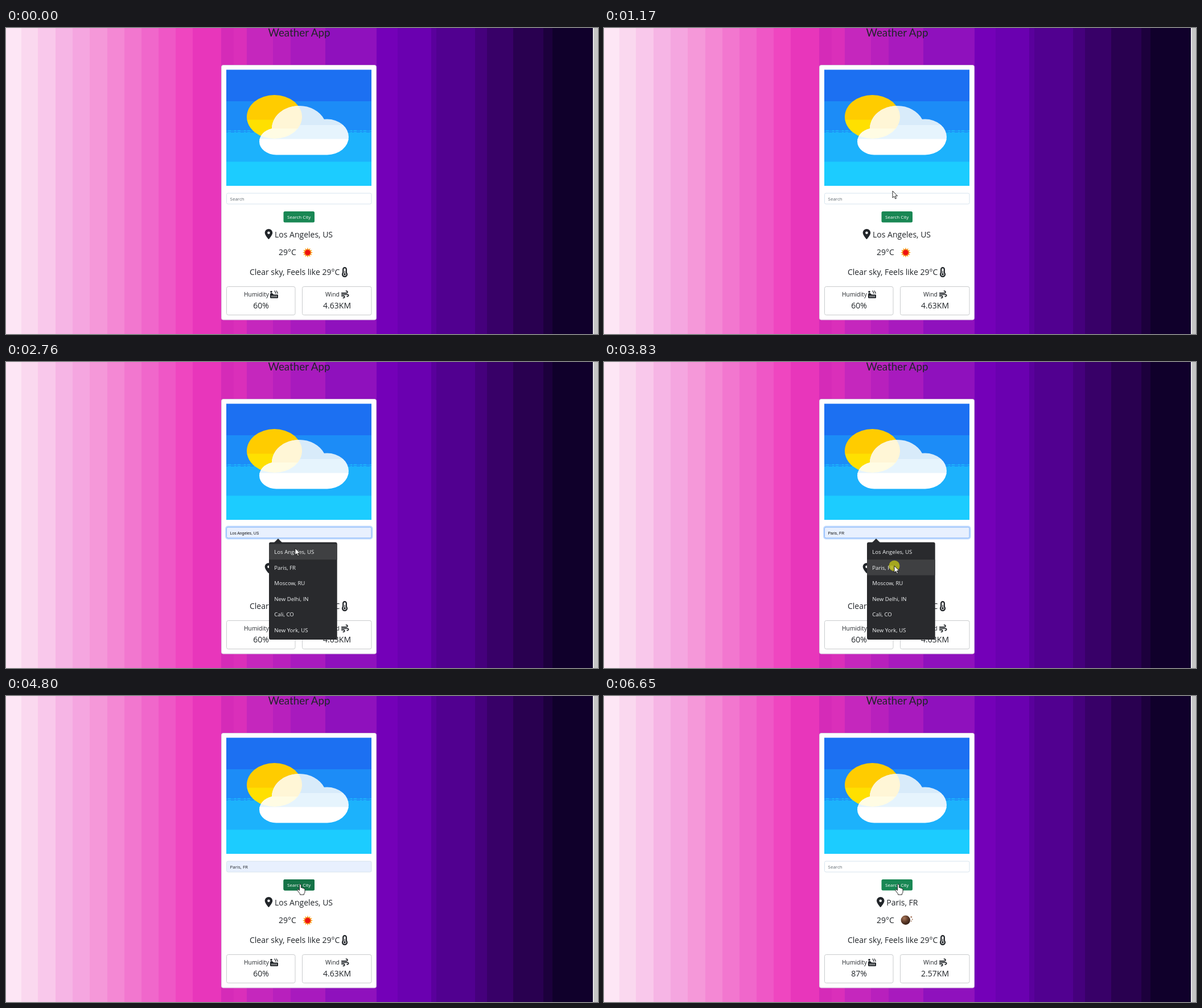
Animation of 1040x539 px, one loop 8000 ms. Source, as an HTML page:

```html
<!DOCTYPE html>
<html lang="en">
<head>
<meta charset="utf-8">
<title>Weather App</title>
<style>
  html, body { margin: 0; width: 100%; height: 100%; overflow: hidden; background: #10002b; }
  svg { display: block; }
  text { font: 500 14px "Open Sans", "Noto Sans", sans-serif; fill: #212529; }
  .mid { text-anchor: middle; }
  .title { font: 400 18.8px Lato, sans-serif; }
  .label { font-size: 10.3px; }
  .small { font-size: 8px; font-weight: 400; }
  .hint { fill: #5f686f; }
  .preview { font: 6.9px "Liberation Sans", Arial, sans-serif; fill: #111; }
  .menu text { font-size: 9.6px; font-weight: 400; fill: #f1f3f4; }
  .icon { fill: #212529; }
  .box { fill: #fff; stroke: #c9cbcd; }
</style>
</head>
<body>
<svg width="1040" height="539" viewBox="0 0 1040 539">
  <defs>
    <clipPath id="cloud">
      <ellipse cx="515" cy="177" rx="48" ry="40"/>
      <ellipse cx="564" cy="192" rx="38" ry="31.5"/>
      <ellipse cx="475" cy="200" rx="30" ry="23.5"/>
      <rect x="475" y="180" width="89" height="43.5"/>
    </clipPath>
    <clipPath id="sun"><ellipse cx="471.5" cy="156.5" rx="48.5" ry="38.5"/></clipPath>
    <radialGradient id="moon" cx=".35" cy=".3" r=".75">
      <stop offset="0" stop-color="#a9785a"/><stop offset=".5" stop-color="#65402d"/><stop offset="1" stop-color="#2d1a12"/>
    </radialGradient>
    <path id="pin" d="M215.7 499.2C267 435 384 279.4 384 192C384 86 298 0 192 0S0 86 0 192c0 87.4 117 243 168.3 307.2c12.3 15.3 35.1 15.3 47.4 0zM192 128a64 64 0 1 1 0 128 64 64 0 1 1 0-128z"/>
  </defs>

  <g id="stripes"></g>
  <path fill="#c5c5c5" d="M1031 0h9v539h-9z"/>
  <path fill="#f4f4f4" d="M1031 0h1.5v539h-1.5z"/>
  <text class="title mid" x="515" y="15">Weather App</text>

  <rect x="378.5" y="65.5" width="272" height="448.5" rx="3" fill="#fff" stroke="#d9cfe0"/>

  <!-- Sky, sun and cloud -->
  <path fill="#1c70f2" d="M387 73.5h255V130H387z"/>
  <path fill="#1c8cf7" d="M387 129h255v52H387z"/>
  <path fill="#1cb2fc" d="M387 180h255v56H387z"/>
  <path fill="#1cccff" d="M387 235.5h255V278H387z"/>
  <path stroke="#1c8cf7" d="M387 182.5h255"/>
  <path stroke="#1c8cf7" stroke-dasharray="3 5 6 3" d="M387 180.5h255M387 183.5h255"/>
  <g clip-path="url(#sun)">
    <path fill="#fc0" d="M420 115h105v47H420z"/>
    <path fill="#ffe000" d="M420 161.5h105v40H420z"/>
  </g>
  <g clip-path="url(#cloud)">
    <path fill="#d8ebfa" d="M440 130h170v42H440z"/>
    <path fill="#e6f4fd" d="M440 171h170v26H440z"/>
    <g clip-path="url(#sun)">
      <path fill="#fff6d6" d="M440 130h90v48h-90z"/>
      <path fill="#fffce4" d="M440 177h90v20h-90z"/>
    </g>
    <path fill="#fff" d="M440 195.5h170v30H440z"/>
  </g>

  <!-- Search form -->
  <rect id="field" x="387.5" y="291" width="254.5" height="19" rx="2.5" stroke="#d6e4ee"/>
  <g id="focus" fill="none">
    <rect x="386.3" y="289.8" width="257" height="21.4" rx="3.5" stroke="#c2dbfe" stroke-width="2.4"/>
    <rect x="387.5" y="291" width="254.5" height="19" rx="2.5" stroke="#86b7fe"/>
  </g>
  <text id="query" x="393.5" y="303.6"></text>
  <path id="caret" stroke="#222" d="M394.5 294v12"/>
  <rect x="487.5" y="323" width="54.5" height="19.5" rx="2.5" fill="#198754"/>
  <rect id="hover" x="487.5" y="323" width="54.5" height="19.5" rx="2.5" fill="#157347"/>
  <text class="small mid" x="514.7" y="335.8" style="fill:#fff">Search City</text>

  <!-- Weather report -->
  <g id="place">
    <use href="#pin" class="icon" transform="translate(454.7 354) scale(.0352)"/>
    <text id="city" x="472" y="369"></text>
  </g>
  <text x="479" y="399.5">29°C</text>
  <g id="day" transform="translate(530 395.5)">
    <path id="rays" fill="#f7a21b"/>
    <circle r="5.4" fill="#f5501c"/><circle r="4.3" fill="#ee1010"/>
  </g>
  <g id="night">
    <circle cx="529.8" cy="394.8" r="8.2" fill="url(#moon)"/>
    <g fill="#a5785e"><circle cx="539.8" cy="389.3" r="1.4"/><circle cx="541.7" cy="393.5" r="1"/><circle cx="539.7" cy="396.5" r="1"/></g>
  </g>
  <text x="428" y="434.8">Clear sky, Feels like 29°C</text>
  <path class="icon" transform="translate(589.4 421) scale(.0352)" d="M160 64c-26.5 0-48 21.5-48 48V276.5c0 17.3-7.1 31.9-15.3 42.5C86.2 332.6 80 349.5 80 368c0 44.2 35.8 80 80 80s80-35.8 80-80c0-18.5-6.2-35.4-16.7-48.9c-8.2-10.6-15.3-25.2-15.3-42.5V112c0-26.5-21.5-48-48-48zM48 112C48 50.2 98.1 0 160 0s112 50.1 112 112V276.5c0 .1 .1 .3 .2 .6c.2 .6 .8 1.6 1.7 2.8c18.9 24.4 30.1 55 30.1 88.1c0 79.5-64.5 144-144 144S16 447.5 16 368c0-33.2 11.2-63.8 30.1-88.1c.9-1.2 1.5-2.2 1.7-2.8c.1-.3 .2-.5 .2-.6V112zM208 368c0 26.5-21.5 48-48 48s-48-21.5-48-48c0-20.9 13.4-38.7 32-45.3V208c0-8.8 7.2-16 16-16s16 7.2 16 16V322.7c18.6 6.6 32 24.4 32 45.3z"/>

  <rect class="box" x="387.5" y="455.5" width="120.5" height="50" rx="3"/>
  <text class="label" x="418" y="473">Humidity</text>
  <circle class="icon" cx="466" cy="464.7" r="1.8"/>
  <path class="icon" d="M464 469q0-2 2-2h1.5l3 2.5H477q1 0 1 1v4q0 1.5-1.5 1.5h-11q-1.5 0-1.5-1.5z"/>
  <path stroke="#fff" d="M467.2 471.3v3.2M469.8 471.3v3.2M472.4 471.3v3.2M475 471.3v3.2"/>
  <path fill="none" stroke="#212529" stroke-width="1.2" d="M472 462.5q0 1.5 1 2.5t1 3M475.2 462.5q0 1.5 1 2.5t1 3"/>
  <text id="humidity" class="mid" x="448" y="494"></text>

  <rect class="box" x="520.5" y="455.5" width="121.5" height="50" rx="3"/>
  <text class="label" x="561" y="473">Wind</text>
  <path class="icon" transform="translate(588.8 462.5) scale(.0268)" d="M288 32c0 17.7 14.3 32 32 32h32c17.7 0 32 14.3 32 32s-14.3 32-32 32H32c-17.7 0-32 14.3-32 32s14.3 32 32 32H352c53 0 96-43 96-96s-43-96-96-96H320c-17.7 0-32 14.3-32 32zm64 352c0 17.7 14.3 32 32 32h32c53 0 96-43 96-96s-43-96-96-96H32c-17.7 0-32 14.3-32 32s14.3 32 32 32H416c17.7 0 32 14.3 32 32s-14.3 32-32 32H384c-17.7 0-32 14.3-32 32zM128 512h32c53 0 96-43 96-96s-43-96-96-96H32c-17.7 0-32 14.3-32 32s14.3 32 32 32H160c17.7 0 32 14.3 32 32s-14.3 32-32 32H128c-17.7 0-32 14.3-32 32s14.3 32 32 32z"/>
  <text id="wind" class="mid" x="581.6" y="494"></text>

  <!-- Suggestions -->
  <g id="menu" class="menu">
    <path fill="#292a2d" d="M470 319l8-8 8 8z"/>
    <rect x="462" y="317.5" width="119.7" height="171.5" rx="3" fill="#292a2d"/>
    <rect id="row" x="462" width="119.7" height="27.6" fill="#3f4042"/>
    <g id="items"></g>
  </g>

  <!-- Pointer -->
  <circle id="click" r="9.5" fill="#c8c814" opacity=".75"/>
  <g id="pointer">
    <path id="arrow" fill="#fff" stroke="#111" stroke-width=".9" d="M0 0v12l2.8-2.5 1.9 4.3 1.9-.8-1.9-4.2h3.8z"/>
    <path id="beam" fill="none" stroke="#111" d="M-3-6.5h2q1 0 1 1 0-1 1-1h2M0-6V6M-3 6.5h2q1 0 1-1 0 1 1 1h2"/>
    <path id="hand" fill="#fff" stroke="#111" stroke-width=".9" d="M-1.5 9.5V1q0-1.5 1.4-1.5T1.3 1v4.5q2.4-.8 2.6 1 2-.8 2.4.8 1.8-.3 1.8 1.5v4q0 2-1.6 3.5v1.7H-.5V16.5L-4.7 11q-1.2-1.7.2-2.3 1.1-.4 3 1.8z"/>
  </g>
</svg>

<script>
const LOOP = 8000;
const $ = id => document.getElementById(id);
const show = (id, on) => $(id).style.display = on ? '' : 'none';
const ramp = (t, start, end) => Math.min(1, Math.max(0, (t - start) / (end - start)));

const stripes = '0 fde6f5,27 fad8ef,56 f9c8eb,87 f6b5e5,117 f5a6e0,147 f598d9,178 f488d4,208 f277cf,238 f067cb,268 ef57c6,298 ef46c0,328 e836bb,378 d52bb8,400 da2fba,423 c527bd,469 b820bd,500 a81abe,561 8f11bd,651 7400b8,688 6a00b0,747 5a009c,756 510090,824 45007c,845 380068,891 290050,944 1c003c,960 10002b';
$('stripes').innerHTML = stripes.split(',').map(s => {
  const [x, color] = s.split(' ');
  return `<path fill="#${color}" d="M${x} 0H1031V539H${x}z"/>`;
}).join('');

const cities = ['Los Angeles, US', 'Paris, FR', 'Moscow, RU', 'New Delhi, IN', 'Cali, CO', 'New York, US'];
$('items').innerHTML = cities.map((c, i) => `<text x="471.3" y="${338.2 + 27.55 * i}">${c}</text>`).join('');

const star = Array.from({ length: 24 }, (_, i) => {
  const a = i * Math.PI / 12, r = i % 2 ? 5.5 : 9;
  return `${r * Math.cos(a)} ${r * Math.sin(a)}`;
});
$('rays').setAttribute('d', `M${star.join('L')}z`);

// Pointer stops: time, x, y
const stops = [
  [70, 910, 395], [260, 882, 368], [330, 855, 343],
  [590, 811, 337], [660, 745, 326], [730, 668, 311], [800, 595, 297], [860, 535, 286],
  [930, 496, 282], [1000, 488, 282], [1070, 498, 285], [1170, 507, 287],
  [1370, 508, 294], [1430, 508, 297], [1500, 508, 300], [1570, 508, 303], [1690, 508, 305.5],
  [2620, 508, 320], [2690, 508, 325], [2760, 508, 328], [2830, 508, 330],
  [3360, 508, 336], [3430, 509, 344], [3500, 509, 351], [3570, 510, 356], [3640, 510, 359],
  [4170, 510, 357], [4240, 511, 351], [4310, 513, 342], [4380, 515, 337], [4450, 516, 334], [4520, 517, 332]
];
// Pointer shapes by start time
const shapes = [[70, 'arrow'], [1370, 'beam'], [2620, 'arrow'], [3980, 'beam'], [4310, 'hand']];
const last = (list, t) => list.filter(k => k[0] <= t).pop();

function setQuery(text, style) {
  $('query').textContent = text;
  $('query').setAttribute('class', style);
}

function draw(t) {
  const done = t >= 6520;
  const open = t >= 2140 && t < 3900;
  const pick = t < 2620 ? -1 : t < 3500 ? 0 : 1;

  if (done || pick < 0) setQuery('Search', 'small hint');
  else setQuery(cities[pick], open ? 'preview' : 'small');
  $('field').setAttribute('fill', pick >= 0 && !done ? '#e8f0fe' : '#fff');
  $('focus').style.opacity = t < 2140 ? 0 : 1 - ramp(t, 4660, 4800);
  show('caret', open && Math.floor((t - 2140) / 500) % 2 === 0);
  $('hover').style.opacity = ramp(t, 4300, 4450) - ramp(t, 6500, 6650);

  show('menu', open);
  show('row', pick >= 0);
  $('row').setAttribute('y', 320.5 + 27.55 * pick);

  $('city').textContent = cities[done ? 1 : 0];
  $('place').setAttribute('transform', `translate(${done ? 24.3 : 0})`);
  show('day', !done);
  show('night', done);
  $('humidity').textContent = done ? '87%' : '60%';
  $('wind').textContent = done ? '2.57KM' : '4.63KM';

  const stop = last(stops, t), shape = last(shapes, t);
  show('pointer', stop);
  show('click', t >= 3830 && t < 3980 || t >= 4660 && t < 4800);
  if (!stop) return;
  const place = `translate(${stop[1]} ${stop[2]})`;
  $('pointer').setAttribute('transform', place);
  $('click').setAttribute('transform', place);
  for (const id of ['arrow', 'beam', 'hand']) show(id, id === shape[1]);
}

const begin = performance.now();
function tick() {
  draw((performance.now() - begin) % LOOP);
  requestAnimationFrame(tick);
}
tick();
</script>
</body>
</html>
```
